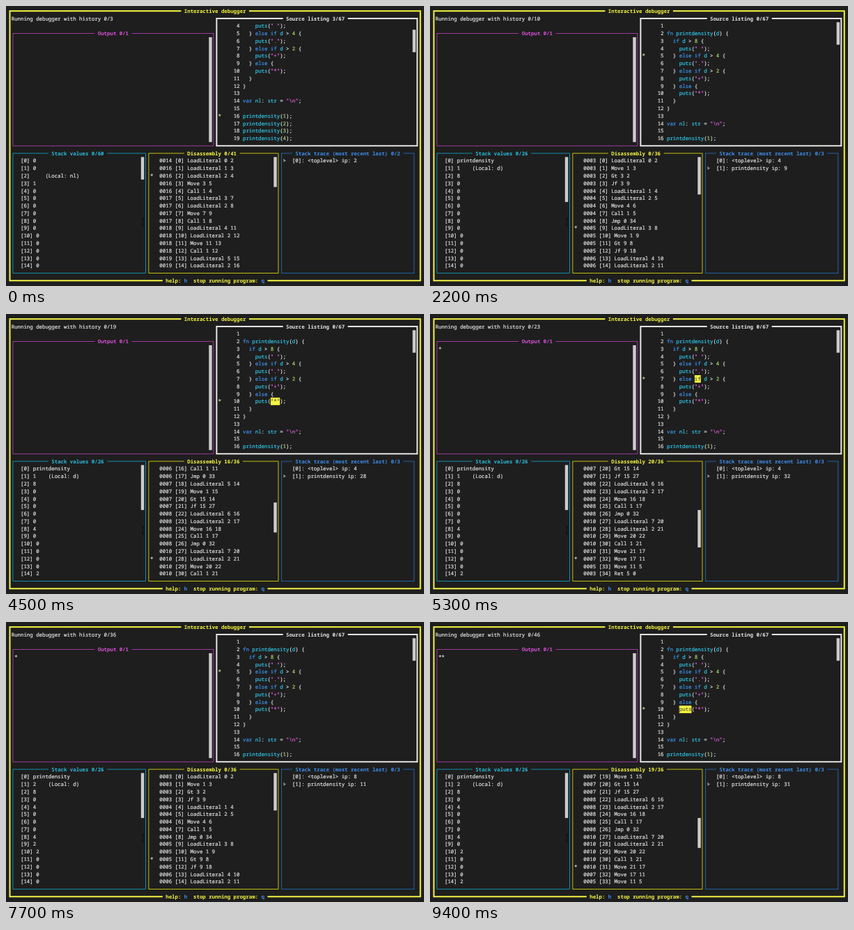
An HTML page with a canvas for the animation above (9500 ms loop, 600x403 px).

```html
<!DOCTYPE html>
<html>
<head>
<meta charset="utf-8">
<style>
  html, body { margin: 0; overflow: hidden; background: #1e1e1e; }
  canvas { display: block; }
</style>
</head>
<body>
<canvas id="stage" width="600" height="403"></canvas>
<script>
const ctx = document.getElementById('stage').getContext('2d');
const LOOP = 9500, CELL_W = 4.43, CELL_H = 10.78;
const BG = '#1e1e1e', FG = '#dcdcdc', YELLOW = '#f5f543', BLUE = '#3b8eea', BAR = '#cccccc';

// ---- the debugged program ----
const source = [
  '', 'fn printdensity(d) {', '  if d > 8 {', '    puts(" ");', '  } else if d > 4 {',
  '    puts(".");', '  } else if d > 2 {', '    puts("+");', '  } else {', '    puts("*");',
  '  }', '}', '', 'var nl: str = "\\n";', ''
];
for (let k = 1; k <= 8; k++) source.push(`printdensity(${k});`);

const parse = text => text.split(';').flatMap(group => {
  const [line, ops] = group.split(':');
  return ops.split(',').map(op => {
    const [name, a, b] = op.trim().replace(/^L /, 'LoadLiteral ').split(' ');
    return { line: +line, name, a: +a, b: +b };
  });
});

const body = {
  name: 'printdensity', count: 36, stack: 26, local: 1, label: 'd',
  literals: [8, ' ', 'puts', 4, '.', 2, '+', '*'],
  code: parse('3:L 0 2,Move 1 3,Gt 3 2,Jf 3 9;4:L 1 4,L 2 5,Move 4 6,Call 1 5,Jmp 0 34;' +
    '5:L 3 8,Move 1 9,Gt 9 8,Jf 9 18;6:L 4 10,L 2 11,Move 10 12,Call 1 11,Jmp 0 33;' +
    '7:L 5 14,Move 1 15,Gt 15 14,Jf 15 27;8:L 6 16,L 2 17,Move 16 18,Call 1 17,Jmp 0 32;' +
    '10:L 7 20,L 2 21,Move 20 22,Call 1 21,Move 21 17;7:Move 17 11;5:Move 11 5;3:Ret 5 0')
};

let calls = '14:L 0 2';
for (let k = 0; k < 8; k++) {
  const r = 4 * k + 3;
  calls += `;${16 + k}:L ${k ? k + 2 : 1} ${r},L 2 ${r + 1},Move ${r} ${r + 2},Call 1 ${r + 1}`;
}
const toplevel = {
  name: '<toplevel>', count: 41, stack: 60, local: 2, label: 'nl',
  literals: ['', 1, 'printdensity', 2, 3, 4, 5, 6, 7, 8], code: parse(calls)
};

// ---- run it, keeping one snapshot per step ----
const scroll = (top, pos) =>
  pos < top + 3 ? Math.max(0, pos - 3) : Math.max(top, pos - 12);

function record(steps) {
  const mem = Array(100).fill(0), history = [];
  const frames = [{ fn: toplevel, ip: 0, base: 0 }];
  let output = '', codeTop = 0, sourceTop = 0;
  while (history.length < steps) {
    const frame = frames[frames.length - 1], { fn, base } = frame;
    const { line, name, a, b } = fn.code[frame.ip];
    codeTop = scroll(codeTop, frame.ip);
    sourceTop = scroll(sourceTop, line - 1);
    history.push({
      fn, ip: frame.ip, line, output, codeTop, sourceTop,
      values: mem.slice(base, base + 15),
      trace: frames.map(f => `${f.fn.name} ip: ${f.ip}`)
    });
    let next = frame.ip + 1;
    if (name === 'LoadLiteral') mem[base + b] = fn.literals[a];
    if (name === 'Move') mem[base + b] = mem[base + a];
    if (name === 'Gt') mem[base + a] = +(mem[base + a] > mem[base + b]);
    if (name === 'Jf' && !mem[base + a]) next = b;
    if (name === 'Jmp') next = b;
    if (name === 'Call') {
      if (mem[base + b] === 'puts') {
        output += mem[base + b + 1];
        mem[base + b] = 0;
      } else {
        frames.push({ fn: body, ip: 0, base: base + b });
        continue;
      }
    }
    if (name === 'Ret') {
      mem[base] = 0;
      frames.pop();
      frames[frames.length - 1].ip++;
      continue;
    }
    frame.ip = next;
  }
  return history;
}
const history = record(50);

// ---- character grid drawing ----
const colX = c => 3.3 + c * CELL_W;
const rowY = r => 7.2 + r * CELL_H;

function text(str, col, row, color = FG, bold = false) {
  ctx.font = `${bold ? 'bold ' : ''}7.383px "Noto Sans Mono", monospace`;
  ctx.fillStyle = ctx.strokeStyle = color;
  ctx.lineWidth = 0.22;
  const x = colX(col), y = rowY(row) + 2.6;
  ctx.fillText(str, x, y);
  if (!bold) ctx.strokeText(str, x, y);
}

function fillCells(col, row, w, h, color) {
  ctx.fillStyle = color;
  ctx.fillRect(colX(col), rowY(row) - CELL_H / 2, w * CELL_W, h * CELL_H);
}

function heading(str, left, right, row, color) {
  const col = left + Math.floor((right - left + 1 - str.length) / 2);
  fillCells(col - 1, row, str.length + 2, 1, BG);
  text(str, col, row, color, true);
  return col;
}

function panel(title, left, top, right, bottom, color, titleColor, weight = 0.8) {
  const x = colX(left + 0.5), y = rowY(top);
  ctx.strokeStyle = color;
  ctx.lineWidth = weight;
  ctx.strokeRect(x, y, colX(right + 0.5) - x, rowY(bottom) - y);
  heading(title, left, right, top, titleColor);
}

function scrollbar(col, row, height, offset, count) {
  const at = v => Math.round(v * height / (count + height - 1));
  const start = at(offset);
  fillCells(col, row + start, 1, at(offset + height) - start, BAR);
}

const TOKEN = /(".*?")|(\d+)|\b(fn|if|else|var)\b|(\w+)|([^\s\w])/g;
const TOKEN_COLORS = ['#d65ad6', '#a5d66a', BLUE, '#2fc0e2', FG];

function sourceLine(str, row) {
  for (const m of str.matchAll(TOKEN)) {
    const kind = m.slice(1).findIndex(Boolean);
    text(m[0], 76 + m.index, row, TOKEN_COLORS[kind]);
  }
}

function activeToken({ fn, ip, line }) {
  if (fn === toplevel) return ip ? String(line - 15) : '"\\n"';
  if (ip > 31) return 'if';
  if (ip === 31) return 'puts';
  return ip >= 27 ? '"*"' : '{';
}

function draw(ms) {
  const t = Math.floor(ms / 100) / 10;
  const step = 3 + Math.floor(2.92 * t + 0.18 * t * t);
  const s = history[step - 1], { fn } = s;
  const blinkOn = (t * 1000 + 2020) % 2120 < 1060;

  ctx.fillStyle = BG;
  ctx.fillRect(0, 0, 600, 403);
  ctx.textRendering = 'geometricPrecision';

  panel('Interactive debugger', 0, 0, 133, 36, YELLOW, YELLOW, 2);
  const help = heading('help: h  stop running program: q', 0, 133, 36, YELLOW);
  for (const [key, at] of [['h', 6], ['q', 31]]) {
    fillCells(help + at, 36, 1, 1, BG);
    text(key, help + at, 36, BLUE, true);
  }
  text(`Running debugger with history 0/${step}`, 1, 1);

  panel('Output 0/1', 1, 3, 66, 18, '#bc3fbc', '#d650d6');
  scrollbar(65, 4, 14, 0, 1);
  text(s.output, 2, 4);

  panel(`Source listing ${s.sourceTop}/67`, 67, 1, 132, 18, '#e5e5e5', '#e5e5e5', 2);
  scrollbar(131, 2, 16, s.sourceTop, 67);
  for (let i = 0; i < 16; i++) {
    const n = s.sourceTop + i + 1, row = i + 2, str = source[n - 1];
    text(String(n), 75 - String(n).length, row);
    sourceLine(str, row);
    if (n !== s.line) continue;
    text('*', 68, row, '#e5e5a0');
    if (blinkOn) {
      const token = activeToken(s), col = 76 + str.indexOf(token);
      fillCells(col, row, token.length, 1, YELLOW);
      text(token, col, row, '#66662a');
    }
  }

  panel(`Stack values 0/${fn.stack}`, 1, 19, 44, 35, '#11a8cd', '#29b8db');
  scrollbar(43, 20, 15, 0, fn.stack);
  s.values.forEach((v, i) => {
    const note = i === fn.local ? `    (Local: ${fn.label})` : '';
    text(`[${i}] ${v}${note}`, 4, 20 + i);
  });

  panel(`Disassembly ${s.codeTop}/${fn.count}`, 45, 19, 87, 35, '#e5e510', YELLOW);
  scrollbar(86, 20, 15, s.codeTop, fn.count);
  for (let i = 0; i < 15; i++) {
    const n = s.codeTop + i, op = fn.code[n];
    if (!op) break;
    text(`${String(op.line).padStart(4, '0')} [${n}] ${op.name} ${op.a} ${op.b}`, 49, 20 + i);
    if (n === s.ip) text('*', 46, 20 + i);
  }

  panel(`Stack trace (most recent last) 0/${s.trace.length + 1}`, 88, 19, 131, 35, '#2472c8', BLUE);
  s.trace.forEach((entry, i) => text(`[${i}]: ${entry}`, 92, 20 + i));
  text('>', 89, 19 + s.trace.length);

  // mouse pointer
  ctx.fillStyle = '#0c0c0c';
  ctx.fillRect(196, 306, 1, 10);
  ctx.fillRect(195, 305, 3, 1);
  ctx.fillRect(195, 316, 3, 1);
}

function tick() {
  draw(performance.now() % LOOP);
  requestAnimationFrame(tick);
}
tick();
</script>
</body>
</html>
```
